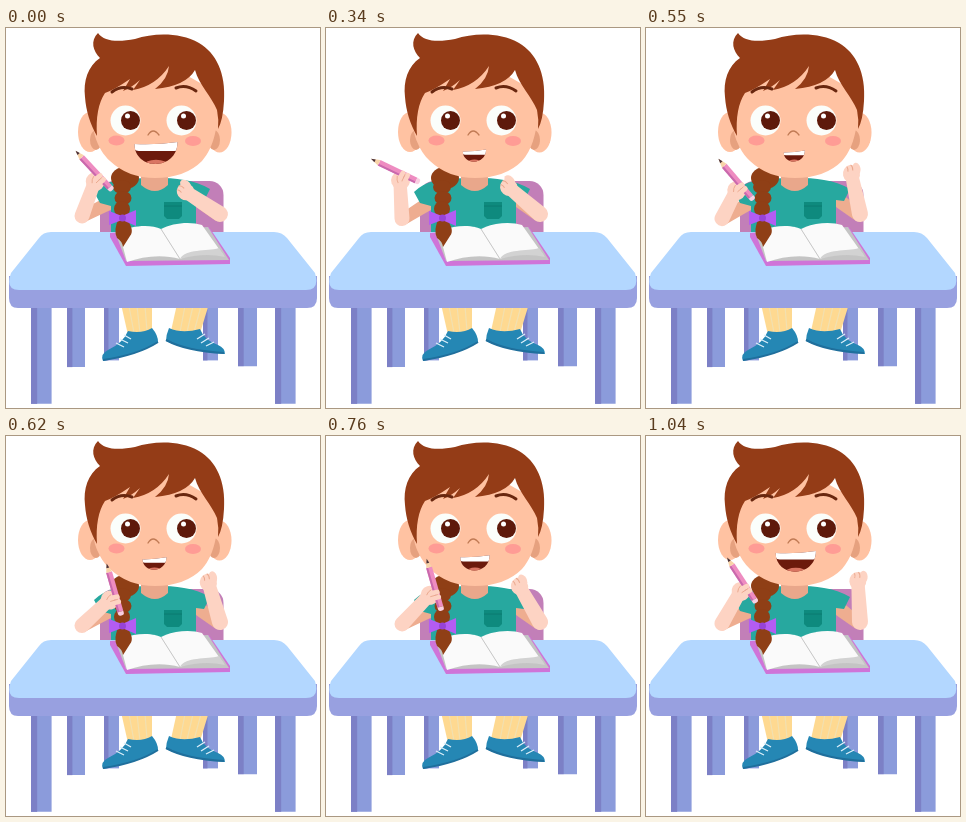
Write an HTML page that moves like this. It is 314 px wide and 380 px high and loops after 1110 ms.

```html
<!DOCTYPE html>
<html lang="en">
<head>
<meta charset="utf-8">
<title>Girl at a desk</title>
<style>
  html, body { margin: 0; width: 100%; height: 100%; overflow: hidden; background: #fff; }
  svg { display: block; width: 314px; height: 380px; }
</style>
</head>
<body>
<svg viewBox="0 0 314 380">
  <defs>
    <clipPath id="mouthClip"><path id="mouthShape"/></clipPath>
    <g id="leg"><path fill="#8b9bdb" d="M0 0h20v96H0z"/><path fill="#7c80c6" d="M0 0h6v96H0z"/></g>
    <g id="eye">
      <circle r="15" fill="#fbfefb"/>
      <circle cx="5" r="9.500" fill="#5e1a0b"/><circle cx="2" cy="-4.500" r="2.500" fill="#fff"/>
    </g>
  </defs>

  <!-- table legs, chair -->
  <use href="#leg" transform="translate(61 270) scale(.9 .72)"/>
  <use href="#leg" transform="translate(232 270) scale(.95 .71)"/>
  <use href="#leg" transform="translate(98 270) scale(.75 .65)"/>
  <use href="#leg" transform="translate(197 270) scale(.75 .65)"/>
  <rect x="94" y="153" width="123.500" height="70" rx="14" fill="#c27fb8"/>

  <!-- trousers and shoes -->
  <g fill="#fed991">
    <path d="M115 276H146V304L122 307Z"/><path d="M171 276H203L194 305L165 303Z"/>
    <path d="M123 278L128 305M131 278L134 305M139 278L141 303M179 278L174 304M187 278L181 304M195 278L188 304" fill="none" stroke="#f2e0b0" stroke-width="1.200"/>
  </g>
  <g fill="#2587b4">
    <path d="M122 303Q136 306 146 300Q152 307 152 314Q135 325 97 333Q94 326 102 322Q117 315 122 303Z"/>
    <path d="M163 300Q160 307 160 313Q178 322 219 326Q219 320 212 317Q198 312 194 301Q176 306 163 300Z"/>
    <path fill="none" stroke="#1f6f9c" stroke-width="2" d="M97 332Q132 327 152 314M160 312Q180 323 218 325"/>
    <path fill="none" stroke="#dceffa" stroke-width="1.300" d="M110 315L118 319M114 311L122 315M118 307L125 311M191 311L199 306M195 315L203 310M200 318L208 314"/>
  </g>

  <!-- body -->
  <g fill="#eead90"><path id="upperL"/><path id="upperR"/></g>
  <path fill="#27a89f" d="M108 153Q96 156 88 164L94 175L105 178V208H190V172L198 173L204 161Q192 154 178 152Q150 147 108 153Z"/>
  <path fill="#0e8a7e" d="M158 174H176V188L173 191H161L158 188Z"/>
  <path d="M158 178H176" stroke="#0b7a70"/>
  <path fill="#e9a78b" d="M135 143H162V157Q149 169 135 157Z"/>
  <ellipse cx="119" cy="150" rx="14" ry="11" fill="#8f3f16"/>

  <!-- head -->
  <g fill="#ffc2a2">
    <ellipse cx="84" cy="104" rx="12" ry="20"/><ellipse cx="213.500" cy="104.500" rx="12" ry="20"/>
    <g fill="#e6a17f"><ellipse cx="90" cy="112" rx="6" ry="10"/><ellipse cx="208" cy="112" rx="6" ry="10"/></g>
    <path d="M85 70C84 101 91 121 104 133Q122 150 149 150Q179 150 196 133C208 119 213 99 212 65L150 30H100Z"/>
  </g>
  <path fill="#943c17" d="M92 5C84 13 87 23 94 30C82 38 77 53 79 69C80 83 84 96 91 108Q89 80 99 65Q108 62 124 51L117 63Q125 60 134 52L127 62Q150 58 163 38Q162 51 149 61Q180 58 189 42C193 57 206 69 211 82Q213 92 212 101Q217 92 218 73C220 45 210 25 193 15C173 4 148 5 129 11C113 14 98 14 92 5Z"/>
  <path fill="none" stroke="#69270f" stroke-width="3" stroke-linecap="round" d="M106 64Q115 57 126 61M170 60Q180 56 190 63"/>
  <use href="#eye" x="119.500" y="92.500"/><use href="#eye" x="175.500" y="92.500"/>
  <g fill="#ff9c95"><ellipse cx="110.500" cy="112.500" rx="8" ry="5"/><ellipse cx="187" cy="113" rx="8" ry="5"/></g>
  <path d="M142 107Q147 99 153 107" fill="none" stroke="#c07a54" stroke-width="1.300" stroke-linecap="round"/>
  <g clip-path="url(#mouthClip)">
    <path fill="#6c1a0c" d="M120 105H180V150H120Z"/>
    <ellipse id="tongue" fill="#d97562"/>
    <path id="teeth" fill="none" stroke="#fff"/>
  </g>

  <!-- table -->
  <use href="#leg" transform="translate(25 276) scale(1.03 1.040)"/>
  <use href="#leg" transform="translate(269 276) scale(1.03 1.040)"/>
  <path fill="#98a0e0" d="M3 248H311V270Q311 280 301 280H12Q3 280 3 270Z"/>
  <path fill="#b3d7ff" d="M45 204H268Q276 204 281 210L309 245Q314 262 300 262H13Q-1 262 5 245L33 210Q37 204 45 204Z"/>

  <!-- book -->
  <path fill="#cf74d8" d="M104 205L203 199L224 230V236L120 238L104 209Z"/>
  <path fill="#c4c4c4" d="M109 204L120 233L223 232L202 199Z"/>
  <path fill="#fafafa" d="M113 204C126 197 145 196 155 201L174 231C157 226 137 228 121 234Z"/>
  <path fill="#fafafa" d="M155 201C166 195 184 193 196 197L218 228C203 224 187 225 174 231Z"/>
  <path fill="#d2d2d2" d="M174 231C180 220 200 224 213 220L219 229Q198 224 174 231Z"/>
  <path fill="none" stroke="#c8c8c8" d="M155 201L174 231"/>

  <!-- right arm -->
  <g fill="#fdd3c3">
    <path id="foreR"/>
    <g id="handR">
      <ellipse rx="9" ry="8.500"/><ellipse cx="4" cy="-6" rx="6" ry="4"/>
      <path d="M3 -2Q7 -3 9 -1M3 3Q6 2 8 3" fill="none" stroke="#eaa98f"/>
    </g>
  </g>

  <!-- braid -->
  <g fill="#8f3f16">
    <ellipse cx="116" cy="159" rx="9" ry="7"/><ellipse cx="117" cy="170" rx="8.500" ry="7"/>
    <ellipse cx="116" cy="181" rx="8" ry="8"/>
    <path d="M113 190H120Q129 202 124 208L117 219Q116 213 111 210Q107 202 113 190Z"/>
  </g>
  <path fill="#b45cf3" d="M103 183L116 188L130 182V198L116 192L103 197Z"/><circle cx="116.500" cy="190" r="3.500" fill="#9743d8"/>

  <!-- left arm and pencil -->
  <g fill="#fdd3c3">
    <path id="foreL"/>
    <g id="grip">
      <ellipse cx="36" cy="7" rx="9.500" ry="9"/>
      <path fill="#ee8cc1" d="M9 -3H50V3H9Z"/><path fill="#c969ad" d="M9 1H50V3H9Z"/>
      <path fill="#f7d3a8" d="M9 -3V3L0 0Z"/><path fill="#4a3038" d="M0 0L4.500 -1.500V1.500Z"/>
      <path fill="#f9cfe2" d="M50 -3H52Q54 -3 54 0Q54 3 52 3H50Z"/>
      <path fill="none" stroke="#fdd3c3" stroke-width="5" stroke-linecap="round" d="M34 8L35 -1M40 8V-1"/>
      <path fill="none" stroke="#eaa98f" stroke-width=".9" d="M37.500 -1V7M31 4Q32 8 35 10"/>
    </g>
  </g>
</svg>
<script>
const LOOP = 1110, HOLD = 200, STEP = 70;
const RAD = Math.PI / 180;
const $ = id => document.getElementById(id);
const set = (id, attrs) => {
  for (const name in attrs) $(id).setAttribute(name, attrs[name]);
};

// Eased value between [step, value] key points
function track(step, ...keys) {
  const i = Math.max(1, keys.findIndex(k => k[0] >= step));
  const [s0, v0] = keys[i - 1], [s1, v1] = keys[i];
  const k = (step - s0) / (s1 - s0);
  return v0 + (v1 - v0) * (1 - Math.cos(k * Math.PI)) / 2;
}

// Tapered capsule between two circles
function limb(x1, y1, r1, x2, y2, r2) {
  const dir = Math.atan2(y2 - y1, x2 - x1);
  const spread = Math.acos((r1 - r2) / Math.hypot(x2 - x1, y2 - y1));
  const at = (x, y, r, a) => `${x + r * Math.cos(a)} ${y + r * Math.sin(a)}`;
  return `M${at(x1, y1, r1, dir + spread)}A${r1} ${r1} 0 1 1 ${at(x1, y1, r1, dir - spread)}` +
    `L${at(x2, y2, r2, dir - spread)}A${r2} ${r2} 0 0 1 ${at(x2, y2, r2, dir + spread)}Z`;
}

// The hand drops outwards, then swings up beside the braid
function drawLeftArm(step) {
  const angle = track(step, [0, 47], [4, 22], [5, 25], [7, 74], [9, 74], [13, 57]);
  const drop = Math.exp(-(((step - 4.5) / 3) ** 2));
  const x = 15.5 + 1.15 * angle, y = 121.5 + 12 * drop;
  const c = Math.cos(angle * RAD), s = Math.sin(angle * RAD);
  const elbowY = 187.5 + 4 * drop;
  set("grip", { transform: `translate(${x} ${y}) rotate(${angle})` });
  set("foreL", { d: limb(76, elbowY, 7.5, x + 36 * c - 8 * s, y + 36 * s + 8 * c, 6.5) });
  set("upperL", { d: limb(78, elbowY, 6, 103, 175, 7) });
}

// The forearm turns around a fixed elbow
function drawRightArm(step) {
  const angle = track(step, [0, 213], [2, 214], [6, 258], [9, 240], [13, 267]);
  const x = 214 + 41 * Math.cos(angle * RAD), y = 186 + 41 * Math.sin(angle * RAD);
  set("foreR", { d: limb(214, 186, 8, x, y, 6.5) });
  set("upperR", { d: limb(212, 187, 6, 195, 174, 7) });
  set("handR", { transform: `translate(${x} ${y}) rotate(${angle}) scale(1 -1)` });
}

// The mouth closes quickly and opens slowly
function drawMouth(step) {
  const open = step < 4.5 ? (1 - step / 4.5) ** 1.3 : (step - 4.5) / 9.5;
  const mid = 148 + 2 * open, half = 8.5 + 13 * open;
  const y = 125 - 10 * open, depth = 8 + 13 * open, low = y + depth * 1.33;
  const left = mid - half, right = mid + half;
  const top = `M${left} ${y + 1}Q${mid} ${y + depth * .1} ${right} ${y - 1}`;
  set("mouthShape", { d: `${top}C${right} ${low} ${left} ${low} ${left} ${y + 1}Z` });
  set("teeth", { d: `M${left + half * .2} ${y}H${right - half * .15}`, "stroke-width": depth * .75, "stroke-linecap": "round" });
  set("tongue", { cx: mid, cy: y + depth * 1.05, rx: half * .55, ry: depth * .25 });
}

function draw(time) {
  const t = time % LOOP;
  const step = t < HOLD ? 0 : 1 + Math.floor((t - HOLD) / STEP);
  drawLeftArm(step);
  drawRightArm(step);
  drawMouth(step);
}

const start = performance.now();
function tick() {
  draw(performance.now() - start);
  requestAnimationFrame(tick);
}
tick();
</script>
</body>
</html>
```
